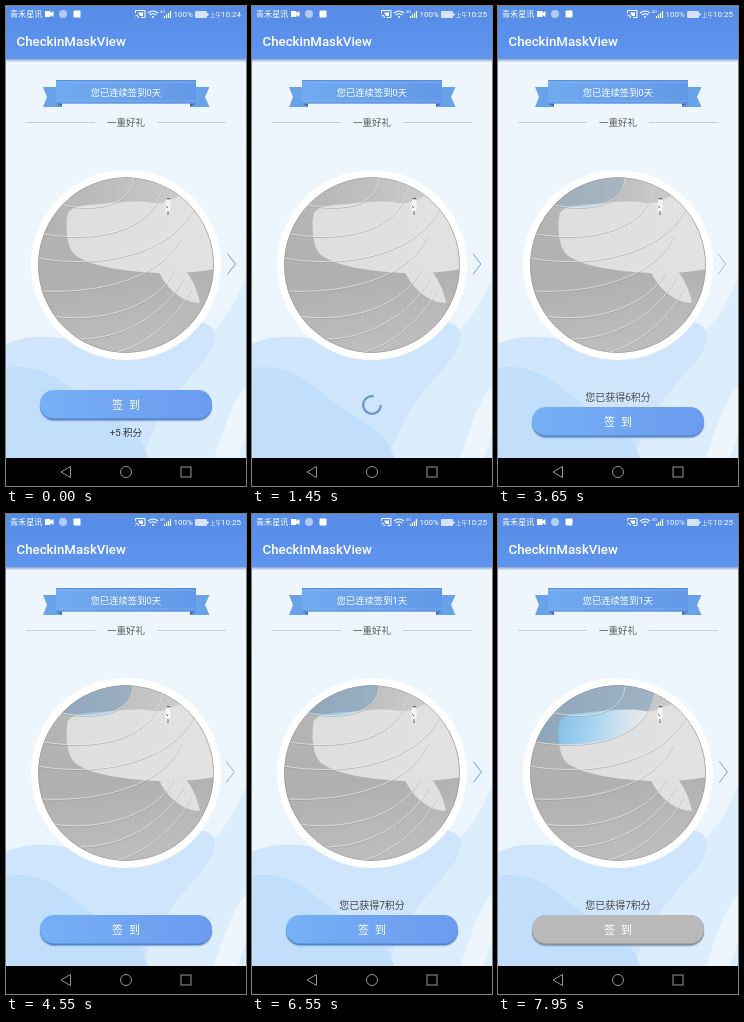
Recreate the animation shown at these times as an HTML page. Size 240 by 480 pixels, loop 8000 ms.

```html
<!DOCTYPE html>
<html lang="zh">
<head>
<meta charset="utf-8">
<style>
html, body { margin: 0; width: 100%; height: 100%; overflow: hidden; background: #000; }
svg { display: block; width: 100%; height: 100%; }
text { font-family: Roboto, "Noto Sans CJK SC", "Noto Sans CJK", sans-serif; }
.mid { text-anchor: middle; }
</style>
</head>
<body>
<svg viewBox="0 0 240 480">
  <defs>
    <linearGradient id="page" x2="0" y2="1"><stop stop-color="#eff6fd"/><stop offset="1" stop-color="#ebf4fd"/></linearGradient>
    <linearGradient id="header" x2="0" y2="1"><stop stop-color="#568ce6"/><stop offset="1" stop-color="#5f95ee"/></linearGradient>
    <linearGradient id="shade" x2="0" y2="1"><stop stop-color="#7b8ea8" stop-opacity=".65"/><stop offset="1" stop-color="#7b8ea8" stop-opacity="0"/></linearGradient>
    <linearGradient id="ribbon" x2="1" y2="0"><stop stop-color="#70aaef"/><stop offset="1" stop-color="#6398e8"/></linearGradient>
    <linearGradient id="blue" x2="1" y2="0"><stop stop-color="#76b0f5"/><stop offset="1" stop-color="#6b9bef"/></linearGradient>
    <linearGradient id="sky" x2="1" y2="0"><stop stop-color="#b2b2b2"/><stop offset=".5" stop-color="#c0c0c0"/><stop offset="1" stop-color="#d2d2d2"/></linearGradient>
    <linearGradient id="sea" x2=".2" y2="1"><stop stop-color="#b2b2b2" stop-opacity="0"/><stop offset=".5" stop-color="#afafaf"/><stop offset="1" stop-color="#bdbdbd"/></linearGradient>
    <linearGradient id="whaleGrey" x2="1" y2="0"><stop stop-color="#dedede"/><stop offset="1" stop-color="#e2e2e2"/></linearGradient>
    <linearGradient id="whaleBlue" gradientUnits="userSpaceOnUse" x1="58" y1="205" x2="136" y2="214"><stop stop-color="#83bfe8"/><stop offset=".5" stop-color="#a9d6f2"/><stop offset="1" stop-color="#e0e8ec"/></linearGradient>
    <linearGradient id="skyBlue" x2="1" y2="0"><stop stop-color="#8da5bb"/><stop offset="1" stop-color="#a6b8c6"/></linearGradient>
    <clipPath id="disc"><circle cx="120" cy="259" r="87.800"/></clipPath>
    <clipPath id="clip0"><path d="M30 160V198H52C80 205 126 204 127 172V160Z"/></clipPath>
    <clipPath id="clip1"><path d="M30 160V228H38C85 236 150 228 157 178V160Z"/></clipPath>
    <path id="whale" d="M62 207C66 200 78 199 95 198C115 196 132 194 147 197C158 199 168 191 180 188C195 191 202 201 209 211V263C190 266 170 268 150 267C115 265 84 260 69 249C60 241 59 217 62 207Z"/>
  </defs>

  <rect width="240" height="452" fill="url(#page)"/>
  <path fill="#dcedfc" d="M240 272C228 300 216 320 200 330L150 345H0V452H240Z"/>
  <path fill="#edf6fd" d="M240 380C225 396 218 425 208 452H232L240 428Z"/>
  <path fill="#cfe5fb" d="M0 338C32 324 62 334 100 338C140 342 165 318 190 316C215 316 213 338 196 357C177 380 155 399 136 452H0Z"/>
  <path fill="#c1defa" d="M0 362C48 355 64 389 104 411C128 424 138 436 142 452H0Z"/>

  <rect width="240" height="53.500" fill="url(#header)"/>
  <rect y="53.500" width="240" height="3" fill="url(#shade)"/>
  <g fill="#fff" font-size="8">
    <text x="4" y="11" font-size="8.100">青禾星讯</text>
    <path d="M39 5h5.500v2l3-2v6l-3-2v2H39z"/>
    <circle cx="57" cy="8" r="4" opacity=".55"/>
    <rect x="67.500" y="4.500" width="7" height="7" rx="1"/>
    <path d="M129.500 7V4.500H139V11.500H135M129.500 9a3 3 0 0 1 3 3M129.500 11.500h.5" fill="none" stroke="#fff"/><path d="M132 6.500h5v3.500h-3z"/>
    <path d="M142 7q5-4 10 0M143.700 9q3.300-2.500 6.600 0" fill="none" stroke="#fff" stroke-width="1.200"/><circle cx="147" cy="11" r="1"/>
    <text x="154" y="7" font-size="4">4G</text>
    <path d="M158.500 12v-2M160.500 12V8.500M162.500 12V7M164.500 12V5" stroke="#fff" stroke-width="1.200"/>
    <text x="167.500" y="11">100%</text>
    <rect x="189" y="5" width="12" height="7" rx="1" opacity=".75"/><path d="M201 7.500h1.500v2H201z"/>
    <text x="204" y="11" font-size="5.500">上午</text>
    <text id="clock" x="215" y="11"></text>
    <text x="10.500" y="40" font-size="13.270" font-weight="500">CheckinMaskView</text>
  </g>

  <g id="banner">
    <path fill="#68a3ea" d="M37 81H56V101H37L41 91ZM203.500 81H184V101H203.500L199 91Z"/>
    <path fill="#4272bb" d="M50 97.500H56V101ZM190 97.500H184V101Z"/>
    <rect x="50" y="74" width="140" height="23.500" fill="url(#ribbon)"/>
    <path d="M50 74.500H190M50 97H190" stroke="#578bd8" stroke-width=".8"/>
    <path d="M51 76.500H189M51 95H189" stroke="#8ab8f2" stroke-width=".5"/>
    <text id="days" class="mid" x="119.800" y="89.500" font-size="9.300" fill="#fff"></text>
  </g>
  <path d="M20 116.500H89M151 116.500H220" stroke="#bcc4ca" stroke-width=".8"/>
  <text class="mid" x="120" y="120" font-size="9.500" fill="#55595d">一重好礼</text>

  <circle cx="120" cy="259" r="95" fill="#fff"/>
  <g clip-path="url(#disc)">
    <rect x="30" y="168" width="180" height="180" fill="url(#sky)"/>
    <rect x="30" y="200" width="180" height="150" fill="url(#sea)"/>
    <use href="#whale" fill="url(#whaleGrey)"/>
    <path fill="#e0e0e0" d="M153 266C161 284 178 297 194 297C191 281 184 270 178 263Z"/>
    <g id="pieces">
      <g clip-path="url(#clip0)"><rect x="30" y="160" width="180" height="90" fill="url(#skyBlue)"/><use href="#whale" fill="url(#whaleBlue)"/></g>
      <g clip-path="url(#clip1)"><rect x="30" y="160" width="180" height="90" fill="url(#skyBlue)"/><use href="#whale" fill="url(#whaleBlue)"/></g>
    </g>
    <path d="M160 194h4l1 7-2 6h-3l-1-6z" fill="#f4f4f4"/><path d="M161 192.500h3M160 200l2 2M162 205v4" stroke="#666"/>
    <path id="seams" fill="none"/>
    <circle cx="120" cy="259" r="87.600" fill="none" stroke="#999" stroke-width=".9"/>
  </g>
  <path id="arrow" d="M221.500 247.500L229.500 258L221.500 268.500" fill="none" stroke="#7398d0"/>

  <text id="reward" class="mid" x="120" y="430" font-size="9.600" fill="#333">+5 积分</text>
  <text id="earned" class="mid" x="120" y="394.500" font-size="10" fill="#444"></text>
  <g id="button">
    <rect x="33.500" y="2.500" width="173" height="29" rx="14.500" fill="#5d7eae" opacity=".35"/>
    <rect x="34" y="1.200" width="172" height="29" rx="14.500" fill="#5183c9"/>
    <rect x="34" width="172" height="28.500" rx="14" fill="url(#blue)"/>
    <g id="disabled">
      <rect x="34" y="1.200" width="172" height="29" rx="14.500" fill="#8f8f8f"/>
      <rect x="34" width="172" height="28.500" rx="14" fill="#b9b9b9"/>
    </g>
    <g class="mid" fill="#fff" font-size="11" font-weight="500"><text x="111.500" y="18.500">签</text><text x="128.500" y="18.500">到</text></g>
  </g>
  <path id="spinner" fill="none" stroke="#6c97d8" stroke-width="2.300"/>

  <rect y="452" width="240" height="28"/>
  <g fill="none" stroke="#a8a8a8" stroke-width=".9"><path d="M64.500 460.500V471.500L55 466Z"/><circle cx="120" cy="466" r="5.500"/><rect x="175" y="461" width="10" height="10"/></g>
</svg>
<script>
const LOOP = 8000;
const $ = id => document.getElementById(id);
const clamp = v => Math.max(0, Math.min(1, v));
const setOpacity = (el, v) => el.setAttribute('opacity', v.toFixed(3));

// Each track is a list of [time, value], linear in between.
const tracks = {
  reward: [[900, 1], [1100, 0]],
  button: [[950, 1], [1150, 0], [2150, 0], [2350, 1], [4700, 1], [4900, 0], [6100, 0], [6300, 1]],
  spinner: [[1050, 0], [1200, 1], [2050, 1], [2150, 0], [4850, 0], [5000, 1], [6000, 1], [6100, 0]],
  earned: [[2400, 0], [2850, .95], [3800, .95], [4000, 0], [6200, 0], [6550, 1]],
  disabled: [[7720, 0], [7870, 1]]
};
const reveals = [[3150, 3950], [6950, 7600]];

function valueAt(track, t) {
  const next = track.findIndex(step => step[0] > t);
  if (next < 0) return track[track.length - 1][1];
  if (next === 0) return track[0][1];
  const [t0, a] = track[next - 1], [t1, b] = track[next];
  return a + (b - a) * (t - t0) / (t1 - t0);
}

const seams = [
  'M52 198C80 205 126 204 127 172', 'M38 228C85 236 150 228 157 178',
  'M32 252C85 262 162 252 188 203', 'M36 285C94 288 157 272 176 230',
  'M46 310C100 318 152 298 168 266', 'M68 333C115 335 160 308 178 272',
  'M108 347C140 340 172 312 186 282'
].join('');
$('seams').setAttribute('d', seams);
for (const [color, width, shift] of [['#8f8f8f', .7, .8], ['#efefef', .9, 0]]) {
  const line = $('seams').cloneNode();
  line.removeAttribute('id');
  line.setAttribute('stroke', color);
  line.setAttribute('stroke-width', width);
  line.setAttribute('opacity', .75);
  line.setAttribute('transform', `translate(0 ${shift})`);
  $('seams').before(line);
}

function arc(cx, cy, r, start, sweep) {
  const at = a => `${cx + r * Math.cos(a)} ${cy + r * Math.sin(a)}`;
  return `M${at(start)}A${r} ${r} 0 ${+(sweep > Math.PI)} 1 ${at(start + sweep)}`;
}

function drawSpinner(t) {
  const second = t > 4000;
  const age = t - (second ? 5000 : 1050);
  const phase = age / 1333 * 2 * Math.PI;
  const sweep = 3 + 1.9 * Math.cos(phase - (second ? 2.5 : 1.88));
  const start = second ? -1.1 + (age - 950) * .006 : (age - 400) * .006;
  $('spinner').setAttribute('d', arc(120, second ? 417 : 399, 8.8, start, sweep));
}

function drawArrow(t) {
  const glow = .58 + .42 * Math.cos((t - 60) / 1600 * 2 * Math.PI);
  setOpacity($('arrow'), glow);
  $('arrow').setAttribute('transform', `translate(${(glow - 1) * 4.5} 0)`);
}

function render(t) {
  for (const id in tracks) setOpacity($(id), valueAt(tracks[id], t));
  reveals.forEach(([from, to], i) =>
    setOpacity($('pieces').children[i], clamp((t - from) / (to - from))));
  drawArrow(t);
  $('clock').textContent = t < 500 ? '10:24' : '10:25';
  $('days').textContent = `您已连续签到${t < 6300 ? 0 : 1}天`;
  $('earned').textContent = `您已获得${t < 5000 ? 6 : 7}积分`;
  $('button').setAttribute('transform', `translate(0 ${t < 1600 ? 384 : 401})`);
  drawSpinner(t);
}

const origin = performance.now();
function tick() {
  render((performance.now() - origin) % LOOP);
  requestAnimationFrame(tick);
}
tick();
</script>
</body>
</html>
```
